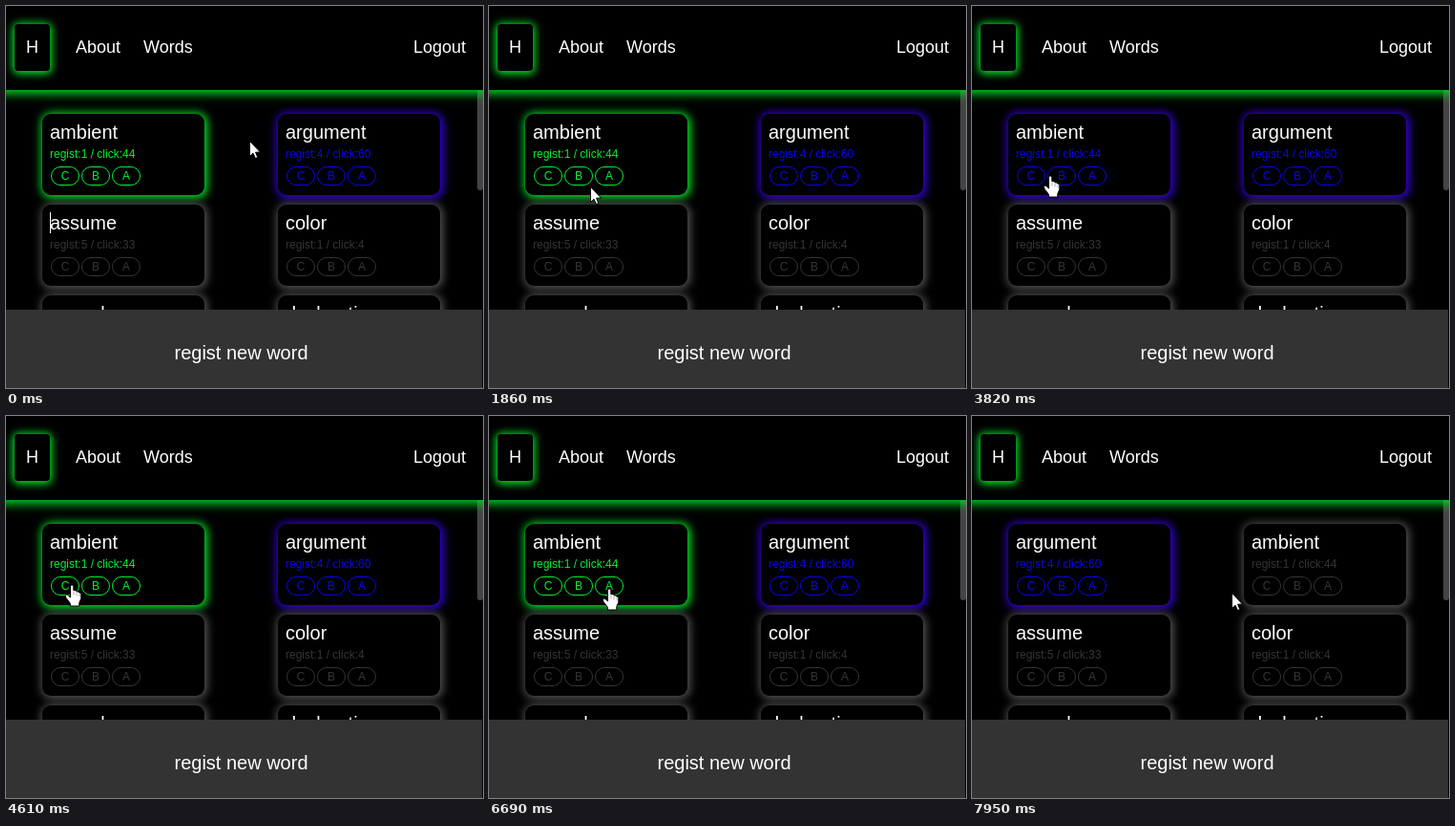
An HTML page with a canvas that plays this animation: 500x400 px, repeating every 8000 ms.

```html
<!DOCTYPE html>
<html lang="en">
<head>
<meta charset="utf-8">
<title>Word list</title>
<style>
html, body { margin: 0; width: 100%; height: 100%; overflow: hidden; background: #000; }
canvas { display: block; width: 500px; height: 400px; }
</style>
</head>
<body>
<canvas id="stage" width="500" height="400"></canvas>
<script>
const ctx = document.getElementById('stage').getContext('2d');
const LOOP = 8000;
const FONT = '"Liberation Sans", Arial, sans-serif';
const FAR = 2000;

const GREEN = { text: '#00f032', glow: '#00f02c' };
const BLUE = { text: '#0a00f5', glow: '#3a00f0' };
const GRAY = { text: '#383436', glow: '#565656' };

const linear = p => p;
const easeOut = p => 1 - (1 - p) * (1 - p);
const smooth = p => p * p * (3 - 2 * p);

// Pointer moves: first step, last step, step count, end x, end y, easing
const MOVES = [
  [460, 590, 3, 258, 130, linear],
  [1120, 1860, 12, 106, 189, smooth],
  [1950, 2140, 4, 92, 178, linear],
  [3820, 4020, 4, 69, 177, easeOut],
  [4810, 4880, 2, 68, 179, linear],
  [5020, 5420, 7, 101, 190, linear],
  [5490, 5760, 5, 123, 184, linear],
  [5830, 5830, 1, 126, 181, linear],
  [7880, 7950, 2, 272, 185, linear]
];
const CLICKS = [[2540, 2610], [4230, 4350], [6560, 6690]];

function pointerAt(t) {
  let x = 255, y = 141;
  for (const [start, end, steps, toX, toY, ease] of MOVES) {
    if (t < start) break;
    const gap = steps > 1 ? (end - start) / (steps - 1) : 1;
    const step = Math.min(steps, Math.floor((t - start + 0.5) / gap) + 1);
    const p = ease(step / steps);
    x += (toX - x) * p;
    y += (toY - y) * p;
  }
  return [Math.round(x), Math.round(y)];
}

function overPill(x, y) {
  return y >= 168 && y < 188 && [47, 79, 111].some(left => x >= left && x < left + 30);
}

function text(str, x, y, size, color, align = 'left') {
  ctx.font = `${size}px ${FONT}`;
  ctx.textAlign = align;
  ctx.fillStyle = color;
  ctx.fillText(str, x, y);
}

function box(x, y, w, h, r) {
  ctx.beginPath();
  ctx.roundRect(x, y, w, h, r);
}

// Black panel with a blurred halo around it
function panel(x, y, w, h, r, color, blur, spread, dx, dy) {
  ctx.save();
  ctx.shadowColor = color;
  ctx.shadowBlur = blur;
  ctx.shadowOffsetX = FAR + dx;
  ctx.shadowOffsetY = dy;
  ctx.fillStyle = '#000';
  box(x - spread - FAR, y - spread, w + 2 * spread, h + 2 * spread, r + spread);
  ctx.fill();
  ctx.restore();
  ctx.fillStyle = '#000';
  box(x, y, w, h, r);
  ctx.fill();
}

function card(x, y, word, regist, click, look) {
  panel(x, y, 170, 85, 9, look.glow, 10, 2, 1, 1);
  text(word, x + 8, y + 26, 20, '#fff');
  text(`regist:${regist} / click:${click}`, x + 8, y + 46, 12, look.text);
  ctx.strokeStyle = look.text;
  ctx.lineWidth = 1;
  ['C', 'B', 'A'].forEach((label, i) => {
    const left = x + 9 + i * 32;
    box(left + 0.5, y + 55.5, 29, 19, 9.5);
    ctx.stroke();
    text(label, left + 15, y + 69, 12, look.text, 'center');
  });
}

function polygon(points) {
  ctx.beginPath();
  points.forEach(([x, y]) => ctx.lineTo(x, y));
  ctx.closePath();
  ctx.fillStyle = '#fff';
  ctx.strokeStyle = '#000';
  ctx.lineWidth = 1;
  ctx.lineJoin = 'round';
  ctx.fill();
  ctx.stroke();
}

function arrow() {
  polygon([[0.5, 0.5], [0.5, 16.5], [4, 13.2], [6.5, 18.5], [8.8, 17.5], [6.6, 12.2], [11.5, 12]]);
}

function hand() {
  polygon([
    [-1.5, 1], [-0.5, 0], [0.8, 0], [1.8, 1], [1.8, 5.5], [4.5, 5.8], [5, 6.8], [7.2, 7],
    [7.8, 8], [9, 8.2], [9.8, 9.5], [9.8, 14], [7.8, 18.5], [7.8, 22], [-1.5, 22],
    [-1.8, 19], [-6, 13.5], [-6.8, 11], [-5.5, 10], [-3.8, 10.8], [-1.5, 13]
  ]);
  ctx.fillStyle = '#777';
  [2, 5, 8].forEach((x, i) => ctx.fillRect(x - 0.3, 6.5 + i, 0.6, 4));
}

function drawPointer(t) {
  const [x, y] = pointerAt(t);
  ctx.save();
  ctx.translate(x, y);
  if (CLICKS.some(([from, to]) => t >= from && t < to)) {
    ctx.strokeStyle = '#fff';
    ctx.lineWidth = 1.5;
    ctx.beginPath();
    ctx.arc(0.5, 0.5, 10, 0, 2 * Math.PI);
    ctx.stroke();
  }
  if (overPill(x, y)) hand();
  else arrow();
  ctx.restore();
}

function drawCards(t) {
  const swapped = t >= 6950;
  const first = t >= 2870 && t < 4610 ? BLUE : GREEN;
  const ambient = ['ambient', 1, 44, swapped ? GRAY : first];
  const argument = ['argument', 4, 60, BLUE];
  const list = [
    ...(swapped ? [argument, ambient] : [ambient, argument]),
    ['assume', 5, 33, GRAY],
    ['color', 1, 4, GRAY],
    ['console', 1, 3, GRAY],
    ['declaration', 1, 2, GRAY]
  ];
  list.forEach((item, i) => card(38 + (i % 2) * 247, 113 + (i >> 1) * 95, ...item));
  if (t < 70) {
    ctx.fillStyle = '#fff';
    ctx.fillRect(46, 216, 1, 22);
  }
}

function drawHeader() {
  panel(-30, -30, 560, 118, 0, '#00d81f', 10, 0, 0, 4);
  panel(9, 19, 37, 49, 4, '#00f02c', 8, 2, 0, 1);
  text('H', 21, 49, 18, '#fff');
  text('About', 73, 49, 18, '#fff');
  text('Words', 144, 49, 18, '#fff');
  text('Logout', 427, 49, 18, '#fff');
}

function drawFooter() {
  ctx.fillStyle = '#333';
  ctx.fillRect(0, 318, 499, 82);
  text('regist new word', 246.5, 370, 20, '#fff', 'center');
}

function draw(t) {
  ctx.fillStyle = '#000';
  ctx.fillRect(0, 0, 500, 400);
  drawCards(t);
  ctx.fillStyle = '#444';
  box(494, 86, 6, 107, 3);
  ctx.fill();
  drawHeader();
  drawFooter();
  drawPointer(t);
}

const begin = performance.now();
function tick() {
  draw((performance.now() - begin) % LOOP);
  requestAnimationFrame(tick);
}
tick();
</script>
</body>
</html>
```
